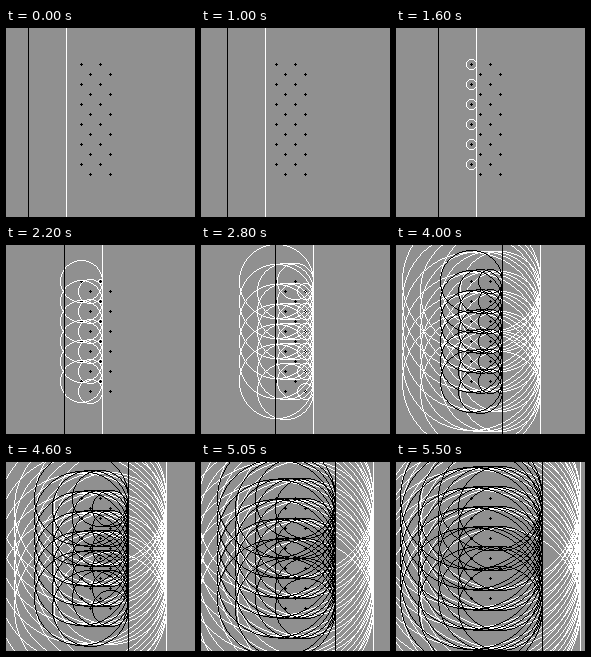
Animation of 189x189 px, one loop 6500 ms. Source, as a matplotlib script:

```python
import numpy as np
import matplotlib.pyplot as plt
from matplotlib.animation import FuncAnimation

SIZE = 189
LOOP_MS, TICK_MS = 6500, 50
HOLD_MS, STEP_MS, LAST_STEP = 1000, 150, 31
SPEED = 4                       # pixels per step
TROUGH_X, CREST_X = 22, 60      # wavefront positions at rest
GRAY, BLACK, WHITE = 144, 0, 255

# Staggered lattice: every second column is shifted down by half a row gap.
COLUMNS = (75, 84, 94, 104)
ATOMS = [(x, 36 + 10 * (col % 2) + 20 * row)
         for col, x in enumerate(COLUMNS) for row in range(6)]


def plot(canvas, xs, ys, shade):
    inside = (xs >= 0) & (xs < SIZE) & (ys >= 0) & (ys < SIZE)
    canvas[ys[inside], xs[inside]] = shade


def draw_ring(canvas, cx, cy, radius, shade):
    """One pixel wide circle, built from mirrored octants."""
    a = np.arange(int(radius / np.sqrt(2) + 0.5) + 1)
    b = np.rint(np.sqrt(radius**2 - a**2)).astype(int)
    for sx in (-1, 1):
        for sy in (-1, 1):
            plot(canvas, cx + sx * a, cy + sy * b, shade)
            plot(canvas, cx + sx * b, cy + sy * a, shade)


def draw_wave(canvas, front, shade):
    """Plane wavefront plus the rings scattered by the atoms it has passed."""
    for x, y in ATOMS:
        if front > x:
            draw_ring(canvas, x, y, front - x, shade)
    canvas[:, front] = shade


def draw_atoms(canvas):
    for x, y in ATOMS:
        canvas[y, x - 1:x + 2] = BLACK
        canvas[y - 1:y + 2, x] = BLACK


def render(step):
    canvas = np.full((SIZE, SIZE), GRAY, dtype=np.uint8)
    draw_atoms(canvas)
    draw_wave(canvas, CREST_X + SPEED * step, WHITE)
    draw_wave(canvas, TROUGH_X + SPEED * step, BLACK)
    return canvas


def step_at(ms):
    if ms < HOLD_MS:
        return 0
    return min(LAST_STEP, 1 + (ms - HOLD_MS) // STEP_MS)


fig = plt.figure(figsize=(SIZE / 72, SIZE / 72), dpi=72)
ax = fig.add_axes([0, 0, 1, 1])
ax.axis("off")
image = ax.imshow(render(0), cmap="gray", vmin=0, vmax=255,
                  interpolation="nearest", aspect="auto")


def update(frame):
    image.set_data(render(step_at(frame * TICK_MS)))
    return [image]


anim = FuncAnimation(fig, update, frames=LOOP_MS // TICK_MS,
                     interval=TICK_MS, repeat=True, repeat_delay=0)
plt.show()
```
